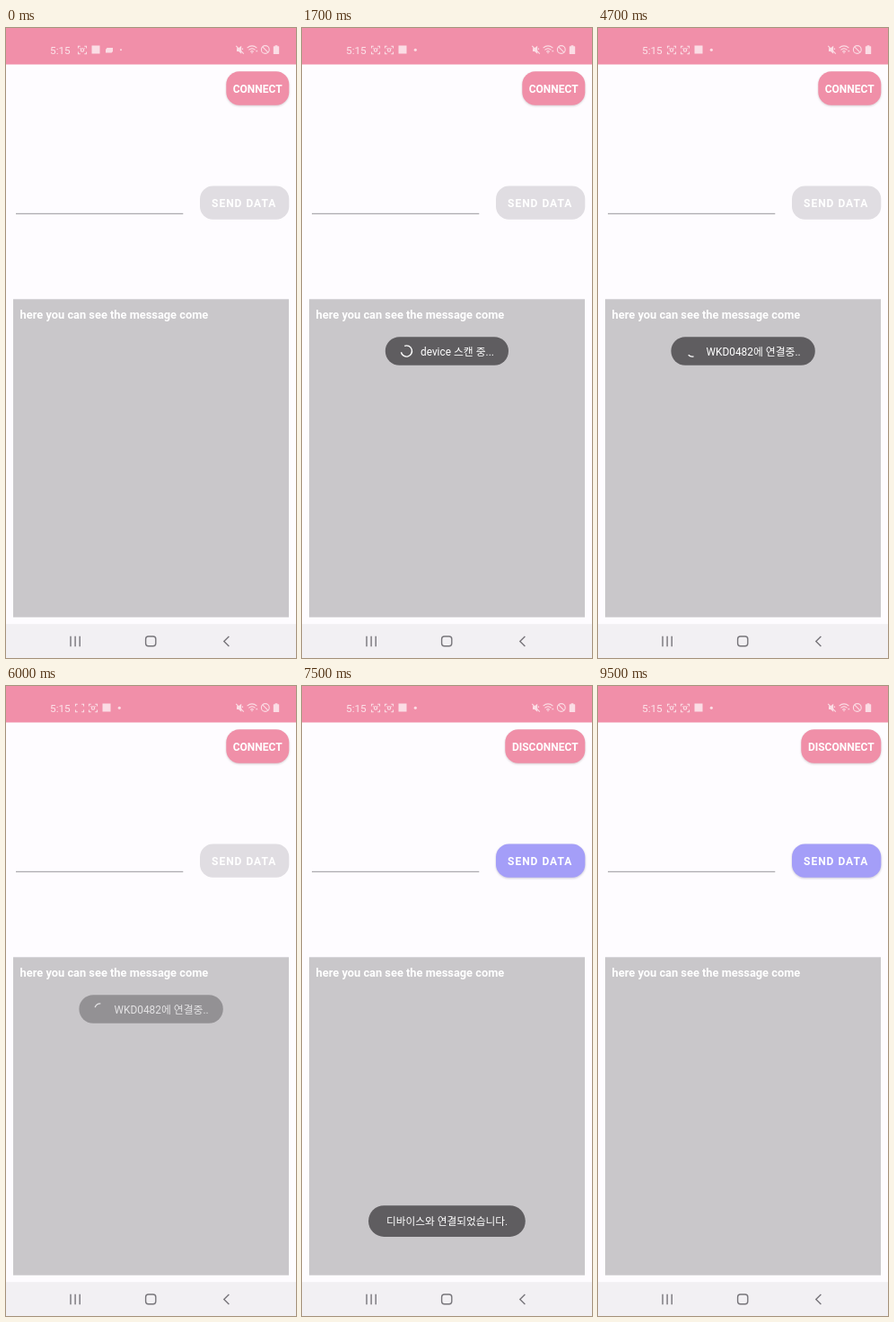
Animation, 323 px wide and 700 px high, one loop 10 s. Source, as an HTML page:

```html
<!DOCTYPE html>
<html lang="en">
<head>
<meta charset="utf-8">
<title>Device connection</title>
<style>
  html, body { margin: 0; width: 100%; height: 100%; overflow: hidden; background: #fefcff; }
  svg { display: block; width: 323px; height: 700px; }
  text { font-family: Roboto, "Noto Sans CJK KR", "Noto Sans CJK", sans-serif; fill: #fff; }
  .label { font-size: 12px; font-weight: 700; }
  .line { fill: none; stroke: #fbdde5; stroke-width: 1.1; }
  .solid { fill: #fbdde5; }
  .nav { fill: none; stroke: #77757a; stroke-width: 1.4; }
  .pill { fill: #5f5d60; }
</style>
</head>
<body>
<svg width="323" height="700" viewBox="0 0 323 700">
  <defs>
    <filter id="soft" x="-10%" y="-20%" width="120%" height="150%">
      <feGaussianBlur stdDeviation="0.9"/>
    </filter>
    <g id="corners" class="line">
      <path d="M-4.5-2V-4.2H-2.2M2.2-4.2H4.5V-2M4.5 2V4.2H2.2M-2.2 4.2H-4.5V2"/>
    </g>
    <g id="lens" class="line">
      <circle r="1.7"/>
      <path d="M-2.8-1.7h1M1.8-1.7h1"/>
    </g>
  </defs>

  <rect width="323" height="700" fill="#fefcff"/>
  <rect width="323" height="40.5" fill="#f18fa9"/>

  <!-- status bar -->
  <text x="49" y="28.7" font-size="11.8" style="fill:#fce4ea">5:15</text>
  <g id="newScan" transform="translate(82 24.5)">
    <use href="#corners"/>
    <use id="blink" href="#lens"/>
  </g>
  <g id="scan"><use href="#corners"/><use href="#lens"/></g>
  <rect id="app" class="solid" x="-4.5" y="-4.5" width="9" height="9"/>
  <path id="extra" class="solid" d="M-2.5-2.5H4V1.5L2.6 3H-4V-.5Z"/>
  <circle id="more" class="solid" cy="24.3" r="1.6"/>

  <path class="solid" d="M257 22.3h2l3.2-2.6v9l-3.2-2.6h-2z"/>
  <path class="line" d="M256.2 19.8l8.6 8.8M263.5 22.5v1.6"/>
  <path class="line" d="M268.6 22.2q5.4-4.6 10.8 0M270.4 24.4q3.6-3 7.2 0M272.2 26.4q1.8-1.5 3.6 0"/>
  <path class="solid" d="M272.8 27.2h2.4l-1.2 1.4zM278 26.2l1.3-1.6 1.3 1.6z"/>
  <circle class="line" cx="288.8" cy="24" r="4.4"/>
  <path class="line" d="M285.7 20.9l6.2 6.2"/>
  <path class="solid" d="M299.6 19.2h2.8v1h1.2q.6 0 .6.6v7.6q0 .6-.6.6h-5.2q-.6 0-.6-.6v-7.6q0-.6.6-.6h1.2z"/>

  <!-- controls -->
  <rect id="linkShade" y="49.2" height="37.5" rx="14.5" fill="#77606a" filter="url(#soft)"/>
  <rect id="link" y="48.2" height="37.6" rx="14.5" fill="#f08fa8"/>
  <text id="linkText" class="label" y="72" text-anchor="end" x="307.6"></text>

  <rect id="sendShade" x="216" y="176.4" width="99.5" height="37.4" rx="14.5" fill="#66628e" opacity=".35" filter="url(#soft)"/>
  <rect id="send" x="216" y="175.4" width="99.3" height="37.4" rx="14.5"/>
  <text class="label" x="229" y="199" letter-spacing="1">SEND DATA</text>
  <path d="M11 206.3H197.3" stroke="#98969a"/>

  <rect x="8" y="301.3" width="307" height="353.4" fill="#c9c7ca"/>
  <text x="15.6" y="322.8" font-size="12.83" font-weight="700">here you can see the message come</text>

  <!-- progress pill -->
  <g id="busy">
    <rect id="busyBox" class="pill" y="343.2" height="31.6" rx="15.8"/>
    <path id="arc" fill="none" stroke="#fff" stroke-width="1.4"/>
    <text id="busyText" y="363.5" font-size="11.85"></text>
  </g>

  <!-- toast -->
  <g id="toast">
    <rect class="pill" x="74" y="577.3" width="174.8" height="34.6" rx="17.3"/>
    <text x="94" y="598.8" font-size="11.7">디바이스와 연결되었습니다.</text>
  </g>

  <!-- navigation bar -->
  <rect y="662.3" width="323" height="37.7" fill="#f2f0f3"/>
  <path class="nav" d="M72 675.8v11.4M77.1 675.8v11.4M82.2 675.8v11.4"/>
  <rect class="nav" x="155.6" y="676" width="11.2" height="10.8" rx="3"/>
  <path class="nav" d="M248.4 676l-5.6 5.5 5.6 5.5"/>
</svg>
<script>
const LOOP = 10000, STEP = 100;
const SPIN_START = 1010, SWAP = 4400, LINKED = 6100;
const el = id => document.getElementById(id);
const set = (id, attrs) => {
  for (const key in attrs) el(id).setAttribute(key, attrs[key]);
};
const ramp = (t, from, to) => Math.min(1, Math.max(0, (t - from) / (to - from)));
const mix = (a, b, p) => a + (b - a) * p;

// Cubic bezier (.4, 0, .2, 1), solved by bisection.
function ease(x) {
  let lo = 0, hi = 1;
  for (let i = 0; i < 20; i++) {
    const s = (lo + hi) / 2, r = 1 - s;
    if (1.2 * r * r * s + 0.6 * r * s * s + s * s * s < x) lo = s; else hi = s;
  }
  return lo * lo * (3 - 2 * lo);
}

function arcPath(cx, cy, r, from, to) {
  const at = deg => {
    const a = deg * Math.PI / 180;
    return (cx + r * Math.sin(a)).toFixed(2) + ' ' + (cy - r * Math.cos(a)).toFixed(2);
  };
  return `M${at(from)}A${r} ${r} 0 ${to - from > 180 ? 1 : 0} 1 ${at(to)}`;
}

function drawStatus(t) {
  const p = ramp(t, 0, 300), shift = mix(0, 12, p);
  set('newScan', { opacity: p });
  set('blink', { opacity: Math.floor(t / 500) % 2 });
  set('scan', { transform: `translate(${85 + shift} 24.5)` });
  set('app', { transform: `translate(${100 + shift} 24)` });
  set('extra', { transform: `translate(${115 + shift} 24.5) scale(${1 - p * 0.6})`, opacity: 1 - p });
  set('more', { cx: mix(128, 126.3, p), r: mix(1, 1.6, p) });
}

function drawButtons(t) {
  const linked = t >= LINKED;
  const x = linked ? 226.3 : 245.3, width = 315.3 - x;
  const pressed = t >= 1000 && t < 1300;
  set('link', { x, width });
  set('linkShade', { x, width, opacity: pressed ? 0.5 : 0.3 });
  el('linkText').textContent = linked ? 'DISCONNECT' : 'CONNECT';
  set('send', { fill: linked ? '#a49ef8' : '#e0dde2' });
  set('sendShade', { opacity: linked ? 0.35 : 0 });
}

function drawBusy(t) {
  const joining = t >= SWAP;
  const x = joining ? 81.4 : 92.8;
  set('busy', { opacity: Math.min(ramp(t, 950, 1200), 1 - ramp(t, LINKED - 200, LINKED)) });
  set('busyBox', { x, width: joining ? 160.4 : 137.2 });
  set('busyText', { x: x + 39.2 });
  el('busyText').textContent = joining ? 'WKD0482에 연결중..' : 'device 스캔 중...';

  const age = Math.max(0, t - SPIN_START), p = age / 1333 % 1;
  const turn = 90 * p + age / 6665 * 720 - (joining ? 158 : 138);
  const tail = 270 * ease(ramp(p, 0.5, 1)), head = 270 * ease(ramp(p, 0, 0.5));
  set('arc', { d: arcPath(x + 23.6, 359, 6.1, turn + tail - 5, turn + head + 5) });
}

function draw(t) {
  drawStatus(t);
  drawButtons(t);
  drawBusy(t);
  const rise = 0.5 - Math.cos(Math.PI * ramp(t, 6170, 6680)) / 2;
  set('toast', { opacity: Math.min(rise, 1 - ramp(t, 8300, 8800)) });
}

const start = performance.now();
function tick() {
  const t = (performance.now() - start) % LOOP;
  draw(Math.floor(t / STEP) * STEP);
  requestAnimationFrame(tick);
}
tick();
</script>
</body>
</html>
```
